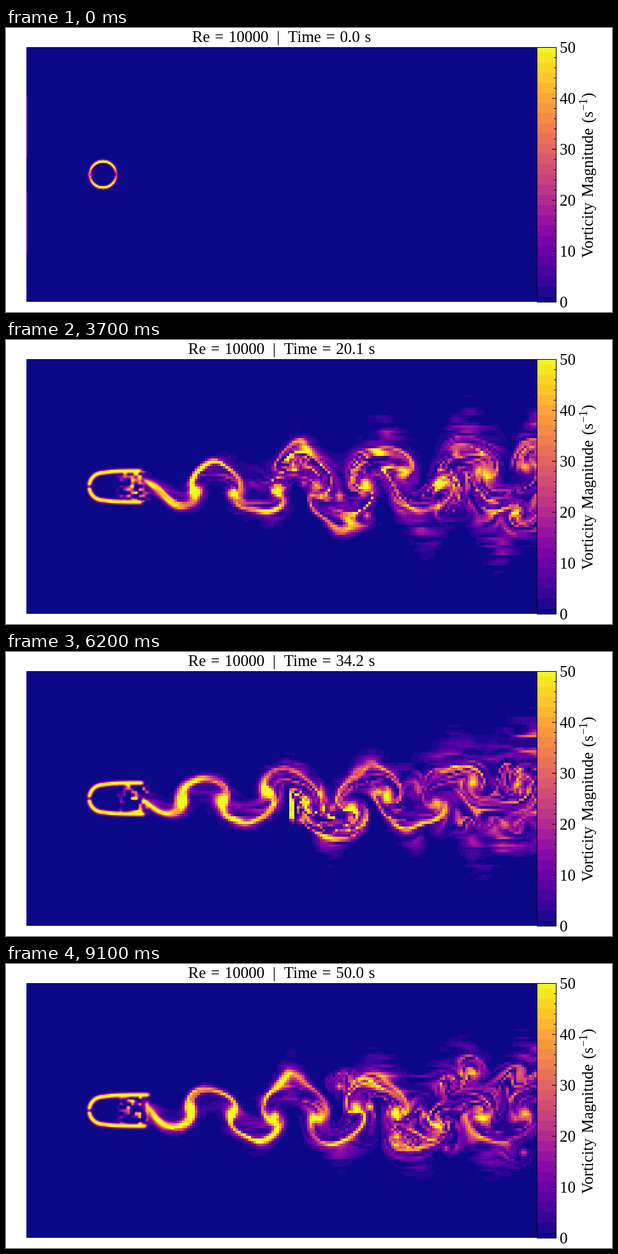
Recreate the animation shown at these times as an HTML page with a canvas. Size 950x446 px, loop 9.2 s.

```html
<!DOCTYPE html>
<html lang="en">
<head>
<meta charset="utf-8">
<title>Cylinder wake vorticity</title>
<style>
html, body { margin: 0; width: 100%; height: 100%; overflow: hidden; background: #fff; }
canvas { display: block; }
</style>
</head>
<body>
<canvas id="stage" width="950" height="446"></canvas>
<script>
const LOOP = 9200, STEP = 100;
const BOX = { x: 32, y: 30, w: 800, h: 400 };
const AXIS = 230, NOSE = 152, RADIUS = 21.5;
const WAVE = 130, DRIFT = 2 * WAVE, TAU = 2 * Math.PI;
const FONT = '"Liberation Serif", "Times New Roman", serif';
const ctx = document.getElementById('stage').getContext('2d');

// Plasma colour map in 26 levels
const stops = ['0d0887', '41049d', '6a00a8', '8f0da4', 'b12a90', 'cc4778',
  'e16462', 'f2844b', 'fca636', 'fcce25', 'f0f921']
  .map(h => [0, 2, 4].map(i => parseInt(h.slice(i, i + 2), 16)));
const levels = Array.from({ length: 26 }, (_, i) => {
  const p = i / 25 * 10, a = Math.min(9, Math.floor(p));
  return stops[a].map((c, j) => Math.round(c + (stops[a + 1][j] - c) * (p - a)));
});

const clamp = (v, lo = 0, hi = 1) => Math.min(hi, Math.max(lo, v));
const ease = v => v * v * (3 - 2 * v);
const ramp = (v, from, to) => ease(clamp((v - from) / (to - from)));
const bell = v => Math.exp(-v * v);
const mix = (a, b, t) => a + (b - a) * t;

function rnd(a, b) {
  const v = Math.sin(a * 127.1 + b * 311.7) * 43758.5453;
  return v - Math.floor(v);
}
function noise(x, y) {
  const i = Math.floor(x), j = Math.floor(y), u = ease(x - i), v = ease(y - j);
  return mix(mix(rnd(i, j), rnd(i + 1, j), u), mix(rnd(i, j + 1), rnd(i + 1, j + 1), u), v);
}

// Key points: step, simulated seconds, x of the first upper crest
const keys = [[0, 0, 320], [23, 12.3, 335], [37, 20.1, 330], [55, 30.3, 287],
  [70, 38.6, 335], [83, 45.8, 297], [91, 50, 320]];
function at(n, col) {
  const i = Math.max(1, keys.findIndex(k => k[0] >= n)), a = keys[i - 1], b = keys[i];
  return mix(a[col], b[col], (n - a[0]) / (b[0] - a[0]));
}

// Half height of the wake at x
const spread = x => 18 + .12 * Math.max(0, x - 225);

// Alternating vortices on the axis crossings of the wave, then small random ones
function eddies(n, crest) {
  const list = [];
  for (let j = -1; j < 9; j++) {
    const id = j - 4 * n, x = crest + WAVE * (.25 + j / 2) + 14 * (rnd(id, 1) - .5);
    const far = Math.max(0, x - 225);
    list.push({
      x, y: AXIS + (rnd(id, 2) - .5) * (14 + far * .08),
      size: 24 + 8 * rnd(id, 3),
      spin: (j % 2 ? -1 : 1) * Math.min(2.4, .5 + far * .005),
      core: 7 + 3 * rnd(id, 4),
      glow: (1.2 - far * .0009) * (.6 + .6 * rnd(id, 5))
    });
  }
  for (let i = 0; i < 22; i++) {
    const x = 430 + 410 * rnd(n, i), big = rnd(i, n + 7);
    list.push({
      x, y: AXIS + (rnd(n + 3, i) - .5) * 1.7 * spread(x),
      size: 11 + 12 * big,
      spin: (rnd(i, n) < .5 ? -1 : 1) * (1.5 + 1.5 * big),
      core: 4 + 2 * big,
      glow: big > .6 ? big * .7 : 0
    });
  }
  return list;
}

function makeFlow(n) {
  const crest = at(n, 2);
  return { n, crest, eddies: eddies(n, crest), grow: Math.min(1, n / 6), front: n < 7 ? 185 + n * 115 : 1e4 };
}

// A wavy vortex sheet and fine streaks, both wound up by the eddies
function wake(flow, x, y) {
  let px = x, py = y, v = 0;
  for (const e of flow.eddies) {
    const dx = px - e.x, dy = py - e.y, d = (dx * dx + dy * dy) / (e.size * e.size);
    if (d > 6) continue;
    const a = -e.spin * Math.exp(-d), c = Math.cos(a), s = Math.sin(a);
    px = e.x + dx * c - dy * s;
    py = e.y + dx * s + dy * c;
    v += e.glow * bell(Math.hypot(x - e.x, y - e.y) / e.core);
  }
  const far = Math.max(0, px - 225), run = px - DRIFT * flow.n;
  const swing = flow.grow * Math.min(58, 17 + far * .17) * (.65 + .6 * noise(run / 70, 9));
  const turn = TAU * (px - flow.crest) / WAVE;
  const mid = AXIS - swing * Math.cos(turn);
  const slope = swing * TAU / WAVE * Math.sin(turn);
  const off = (py - mid) / Math.hypot(1, slope);

  const line = bell(off / (4.5 + 4 * noise(run / 40, 2)));
  v += line * Math.max(.35, 1.35 - far * .0019) * (.35 + .9 * noise(run / 20, off / 5 + 4));

  const h = spread(px) * (.65 + .6 * noise(run / 45, py > AXIS ? 20 : 30));
  const env = bell(((py - AXIS - .45 * (mid - AXIS)) / h) ** 2);
  const streak = Math.max(0, noise(run / 26, py / 5.5) - .3);
  v += env * (.04 + Math.min(1, .3 + far * .0015) * streak * (.4 + noise(run / 34, py / 22 + 50)));
  return v * ramp(x, 205, 235) * (1 - ramp(x, flow.front - 30, flow.front));
}

// Boundary layer, the two free shear layers and the dead water between them
function body(n, x, y) {
  const dx = x - NOSE, dy = y - AXIS, side = dy < 0 ? 1 : 2;
  const half = RADIUS + 3 * (1 - Math.exp(-Math.max(0, dx) / 15));
  const off = dx < 0 ? Math.hypot(dx, dy) - RADIUS : Math.abs(dy) - half;
  const end = 175 + Math.min(1, n / 2) * (30 + 28 * rnd(n, side));
  let v = 1.4 * bell(off / 3) * (1 - ramp(x, end, end + 10)) * (.2 + .8 * ramp(Math.abs(dy), 0, 5));
  if (Math.hypot(dx, dy) > RADIUS && off < 0)
    v += ramp(x, 166, 205) * (1 - ramp(x, 212, 230)) * 2.2 * Math.max(0, noise(x / 6 + n * 9, y / 5) - .4);
  return v;
}

// State at rest: a ring and two faint strips at the inlet
function rest(x, y) {
  const dx = x - NOSE, dy = y - AXIS, r = Math.hypot(dx, dy), lift = Math.abs(dy) / r;
  const inlet = x < 34 && Math.abs(Math.abs(dy) - 75) < 50 ? .13 : 0;
  const stagnation = .3 * bell((Math.hypot(x - 132, dy) - 2.5) / 1.2);
  return inlet + stagnation + bell((r - 20.5) / 1.9) * (.3 + 1.3 * lift) + .15 * bell((r - 22) / 2);
}

function sheet(cell, x, y, w, h) {
  const c = document.createElement('canvas');
  c.width = w / cell;
  c.height = h / cell;
  const g = c.getContext('2d');
  return { c, g, img: g.createImageData(c.width, c.height), cell, x, y, w, h };
}
const coarse = sheet(4, BOX.x, BOX.y, BOX.w, BOX.h);
const fine = sheet(2, BOX.x, BOX.y, 232, BOX.h);

function paint(s, flow) {
  const { width, height, data } = s.img;
  for (let j = 0, i = 0; j < height; j++) {
    for (let k = 0; k < width; k++, i += 4) {
      const x = s.x + (k + .5) * s.cell, y = s.y + (j + .5) * s.cell;
      let v = 0;
      if (!flow.n) v = rest(x, y);
      else if (x > 125 && Math.abs(y - AXIS) < 145) {
        if (x > 205) v += wake(flow, x, y);
        if (x < 260) v += body(flow.n, x, y);
      }
      const [r, g, b] = levels[clamp(Math.round(v * 25), 0, 25)];
      data[i] = r;
      data[i + 1] = g;
      data[i + 2] = b;
      data[i + 3] = 255;
    }
  }
  s.g.putImageData(s.img, 0, 0);
  ctx.drawImage(s.c, s.x, s.y, s.w, s.h);
}

function bar() {
  const x = 833, w = 29;
  levels.forEach((c, i) => {
    const y0 = Math.max(0, (i - .5) * 16), y1 = Math.min(400, (i + .5) * 16);
    ctx.fillStyle = `rgb(${c})`;
    ctx.fillRect(x, 430 - y1, w, y1 - y0);
  });
  ctx.strokeStyle = ctx.fillStyle = '#000';
  ctx.lineWidth = 1;
  ctx.strokeRect(x - .5, 30.5, w + 1, 400);
  ctx.textAlign = 'left';
  ctx.font = '25px ' + FONT;
  for (let v = 0; v <= 50; v += 2) {
    const y = 430.5 - v * 8, major = v % 10 === 0;
    ctx.beginPath();
    ctx.moveTo(x + w, y);
    ctx.lineTo(x + w - (major ? 6 : 3), y);
    ctx.stroke();
    if (major) ctx.fillText(v, 868, y + 8.5);
  }
}

function axisLabel() {
  ctx.save();
  ctx.translate(920, 361);
  ctx.rotate(-Math.PI / 2);
  ctx.wordSpacing = '2px';
  let pos = 0;
  for (const [text, size, up] of [['Vorticity Magnitude (s', 25, 0], ['\u22121', 18, 9], [')', 25, 0]]) {
    ctx.font = `${size}px ${FONT}`;
    ctx.fillText(text, pos, -up);
    pos += ctx.measureText(text).width + 1;
  }
  ctx.restore();
}

function title(n) {
  ctx.font = '25px ' + FONT;
  ctx.textAlign = 'center';
  ctx.wordSpacing = '1.5px';
  ctx.fillText(`Re = 10000 \u2009|\u2009 Time = ${at(n, 1).toFixed(1)} s`, 432, 22);
  ctx.wordSpacing = '0px';
}

function render(n) {
  const flow = makeFlow(n);
  ctx.fillStyle = '#fff';
  ctx.fillRect(0, 0, 950, 446);
  ctx.imageSmoothingEnabled = false;
  paint(coarse, flow);
  paint(fine, flow);
  bar();
  axisLabel();
  title(n);
}

let shown = -1;
const t0 = performance.now();
function tick() {
  const n = Math.floor((performance.now() - t0) % LOOP / STEP);
  if (n !== shown) render(shown = n);
  requestAnimationFrame(tick);
}
tick();
</script>
</body>
</html>
```
